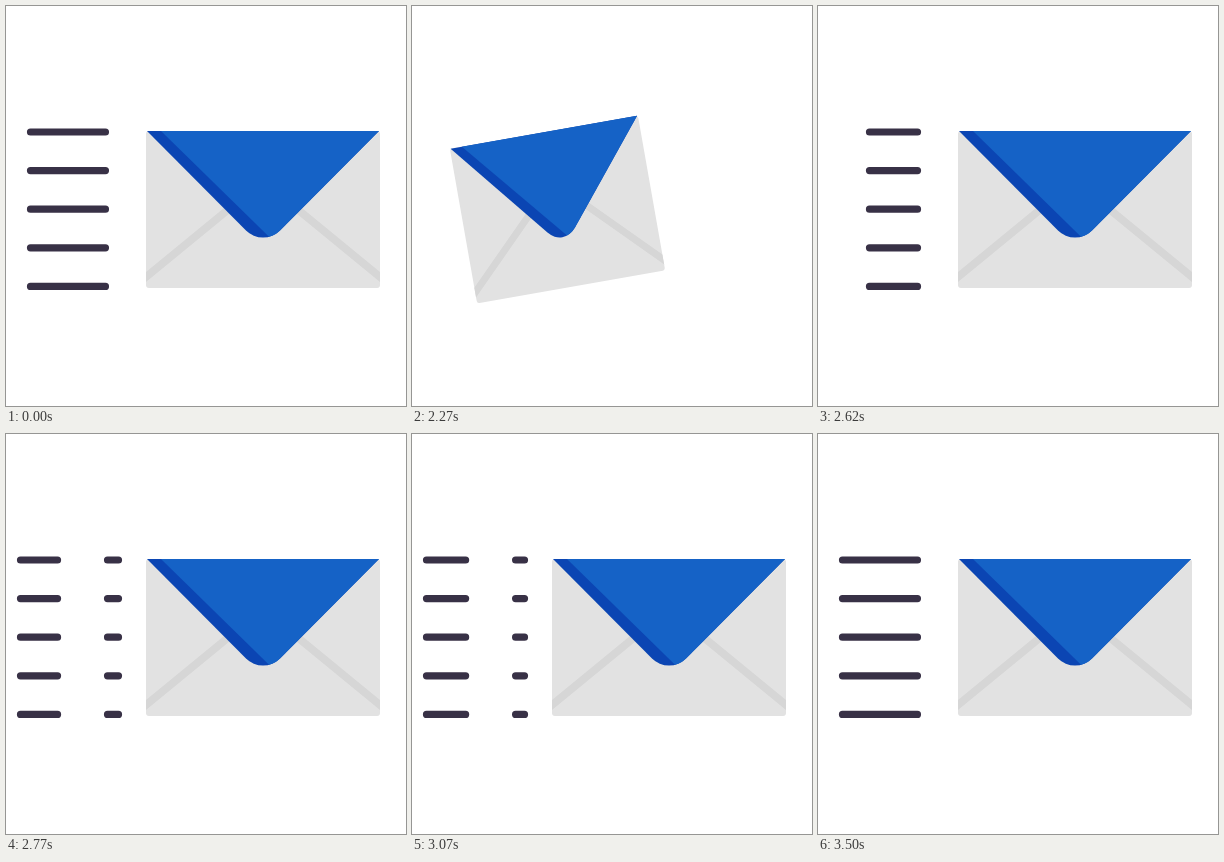
An HTML page that plays this animation: 400x400 px, repeating every 3.52 s.

```html
<!DOCTYPE html>
<html lang="en">
<head>
<meta charset="utf-8">
<title>Flying envelope</title>
<style>
  html, body { margin: 0; width: 100%; height: 100%; overflow: hidden; background: #fff; }
  svg { display: block; width: 100vw; height: 100vh; }
</style>
</head>
<body>
<svg viewBox="0 0 400 400">
  <defs>
    <clipPath id="body"><rect x="140" y="125" width="234" height="157" rx="3"/></clipPath>
  </defs>
  <path id="lines" fill="none" stroke="#383146" stroke-width="7.2" stroke-linecap="round"/>
  <g id="mail">
    <rect x="140" y="125" width="234" height="157" rx="3" fill="#e2e2e2"/>
    <path d="M130 279.2L257 175L384 279.2" fill="none" stroke="#d6d6d6" stroke-width="7.7" clip-path="url(#body)"/>
    <path d="M141 125H373L274 224.5A24 24 0 0 1 240 224.5Z" fill="#0b45b3"/>
    <path d="M155 125H373L274 224.5A24 24 0 0 1 263 230.8Z" fill="#1562c6"/>
  </g>
</svg>
<script>
  const LOOP = 3520, HOLD = 2000, TICK = 25;
  const X0 = 14.5, LEN = 98;              // track of each speed line
  const REST = { start: 0.102, size: 0.765 };
  const BACK = 21.6, STREAM = 21, GROW = 57, LAST = 60;
  const mail = document.getElementById("mail");
  const lines = document.getElementById("lines");

  const clamp = v => Math.min(1, Math.max(0, v));
  const smooth = v => { v = clamp(v); return v * v * (3 - 2 * v); };
  const snap = d => d <= 0 ? 0 : 1 - Math.exp(-0.545 * Math.pow(d, 1.8));

  // Pull back at once, wait, then shoot forward
  const pull = k => snap(Math.min(k, BACK - k));

  // Visible part of a line as fractions of its track
  function trim(k) {
    if (k < STREAM) {
      return { start: REST.start, size: REST.size * clamp(1 - 1.08 * pull(k)) * (k < BACK / 2 || 0) };
    }
    const g = smooth((k - GROW) / (LAST - GROW));
    const size = 0.49 + (REST.size - 0.49) * g;
    const end = 0.378 + 0.0851 * (k - 31) + 0.021 * g;
    const start = end - size;
    return { start: start - Math.floor(start), size };
  }

  function linePath({ start, size }) {
    if (size < 0.005) return "";
    const end = start + size;
    const parts = end > 1 ? [[start, 1], [0, end - 1]] : [[start, end]];
    let d = "";
    for (let i = 0; i < 5; i++) {
      const y = 126 + 38.6 * i;
      for (const [a, b] of parts) d += `M${X0 + LEN * a} ${y}H${X0 + LEN * b}`;
    }
    return d;
  }

  function draw(ms) {
    const t = Math.max(0, ms % LOOP - HOLD);
    const k = Math.min(LAST, Math.floor((Math.floor(t / 10) * 10 + 9) / TICK));
    const p = pull(k);
    mail.setAttribute("transform",
      `translate(${257 - 111.5 * p} 203.5) rotate(${-10 * p}) scale(${1 - 0.184 * p} 1) translate(-257 -203.5)`);
    lines.setAttribute("d", linePath(trim(k)));
  }

  const begin = performance.now();
  function loop(now) {
    draw(Math.max(0, now - begin));
    requestAnimationFrame(loop);
  }
  draw(0);
  requestAnimationFrame(loop);
</script>
</body>
</html>
```
